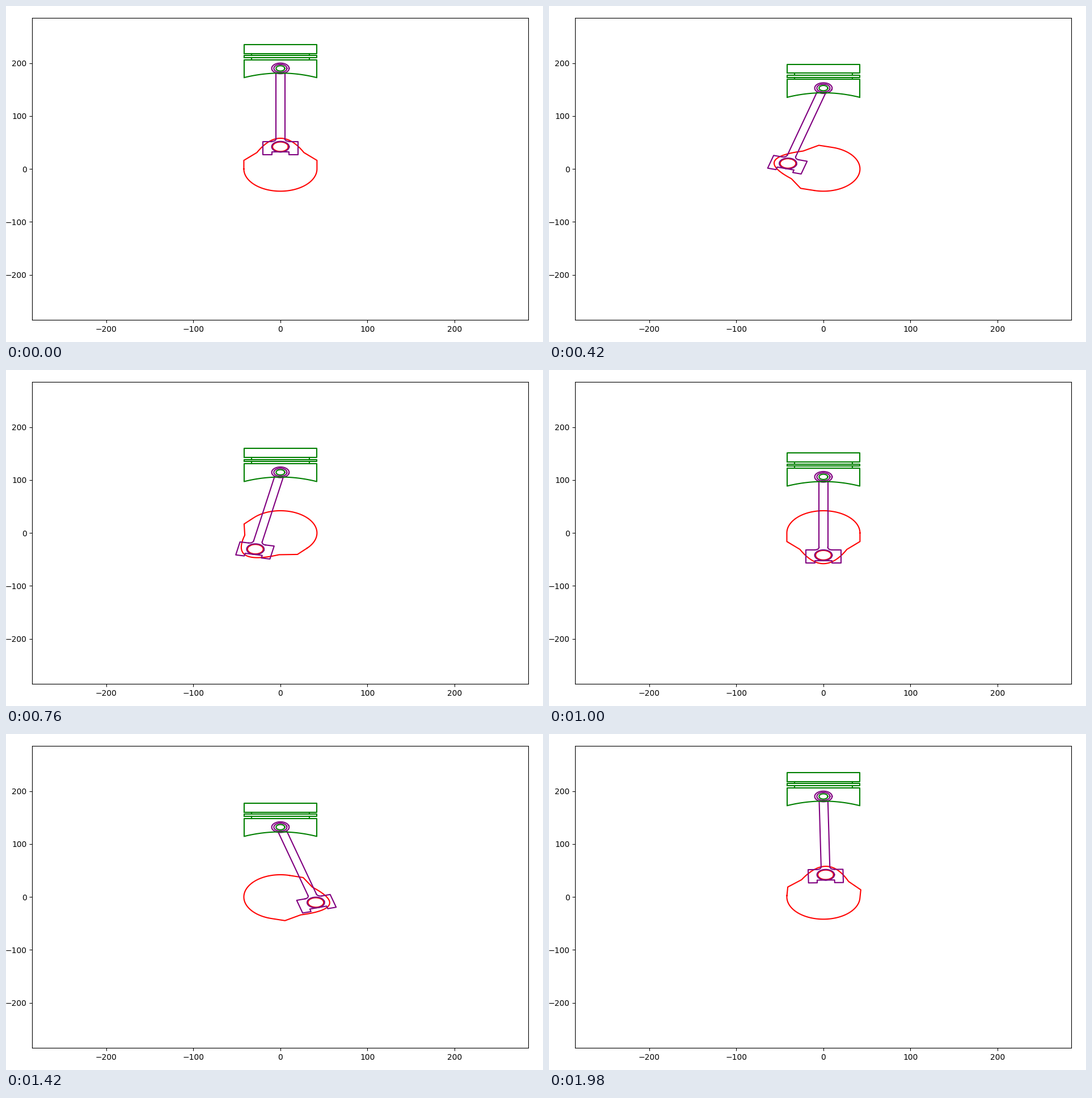
Animation, 947 px wide and 592 px high, one loop 2000 ms. Source, as a matplotlib script:

```python
import numpy as np
import matplotlib.pyplot as plt
from matplotlib.animation import FuncAnimation

W, H, DPI = 947, 592, 100
FRAMES, INTERVAL = 100, 20
CRANK, ROD = 42, 148
LIMIT = 1.5 * (CRANK + ROD)


def arc(cx, cy, r, start, end, n=60):
    a = np.radians(np.linspace(start, end, n))
    return np.column_stack([cx + r * np.cos(a), cy + r * np.sin(a)])


def circle(cx, cy, r):
    return arc(cx, cy, r, 0, 360, 100)


def rect(x, y0, y1):
    return np.array([(-x, y0), (x, y0), (x, y1), (-x, y1), (-x, y0)])


def parabola(x, edge, top):
    xs = np.linspace(-x, x, 61)
    return np.column_stack([xs, top + (edge - top) * (xs / x) ** 2])


def mirrored(*strokes):
    return [s * [side, 1] for s in map(np.array, strokes) for side in (1, -1)]


def rotate(pts, a):
    c, s = np.cos(a), np.sin(a)
    return pts @ np.array([[c, s], [-s, c]])


def crank_strokes():
    body = np.vstack([
        arc(0, 0, CRANK, 180, 360),
        [(42, 16.2)],
        parabola(27, 31, 58)[::-1],
        [(-42, 16.2), (-42, 0)],
    ])
    return [body, circle(0, CRANK, 9)]


def rod_strokes():
    # Origin at the crank pin, wrist pin straight above.
    top = ROD - np.sqrt(10 ** 2 - 5 ** 2)
    side = [(5, top), (5, 15)]
    fillet = arc(10, 15, 5, 180, 270, 15)
    foot = [(10, 10), (20, 10), (20, -15), (10, -15), (10, -10), (0, -10)]
    return mirrored(side, fillet, foot) + [
        circle(0, 0, 10), circle(0, ROD, 10), circle(0, ROD, 7.5)]


def piston_strokes():
    # Origin at the wrist pin.
    x, tie = 41.5, 33.2
    skirt = np.array([(-x, -17.3), (-x, 16.3), (x, 16.3), (x, -17.3)])
    ties = mirrored(*[[(tie, y), (tie, y + 4)] for y in (16.3, 24.3)])
    return [rect(x, 28.3, 45), rect(x, 20.3, 24.3), skirt,
            parabola(x, -17.3, -8.9), circle(0, 0, 5)] + ties


class Part:
    """Strokes of one colour that move together."""

    def __init__(self, ax, strokes, color):
        self.strokes = strokes
        self.lines = [ax.plot([], [], color=color)[0] for _ in strokes]

    def place(self, shift, angle=0):
        for line, pts in zip(self.lines, self.strokes):
            line.set_data(*(rotate(pts, angle) + shift).T)


fig, ax = plt.subplots(figsize=(W / DPI, H / DPI), dpi=DPI, facecolor="white")
fig.subplots_adjust(left=0.049, right=0.973, bottom=0.066, top=0.964)
ax.set_xlim(-LIMIT, LIMIT)
ax.set_ylim(-LIMIT, LIMIT)
ax.set_xticks(range(-200, 201, 100))
ax.set_yticks(range(-200, 201, 100))

crank = Part(ax, crank_strokes(), "red")
rod = Part(ax, rod_strokes(), "purple")
piston = Part(ax, piston_strokes(), "green")


def update(i):
    angle = 2 * np.pi * i / FRAMES
    pin = CRANK * np.array([-np.sin(angle), np.cos(angle)])
    tilt = np.arcsin(pin[0] / ROD)
    crank.place((0, 0), angle)
    rod.place(pin, tilt)
    piston.place((0, pin[1] + ROD * np.cos(tilt)))
    return crank.lines + rod.lines + piston.lines


anim = FuncAnimation(fig, update, frames=FRAMES, interval=INTERVAL,
                     repeat=True, repeat_delay=0)
plt.show()
```
